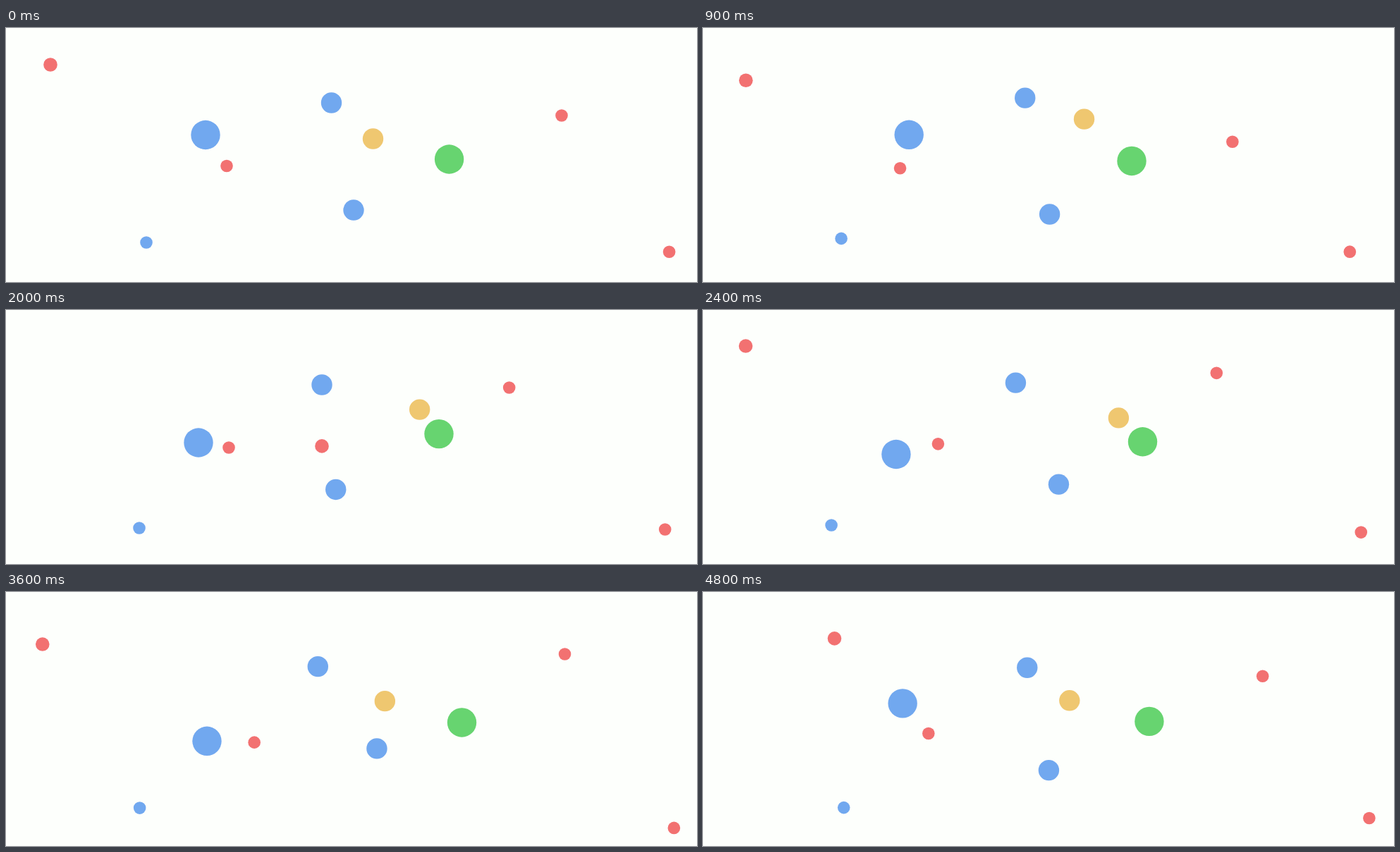
Recreate the animation shown at these times as an HTML page. Size 980 px wide and 360 px high, loop 4900 ms.

```html
<!DOCTYPE html>
<html lang="en">
<head>
<meta charset="utf-8">
<title>Drifting dots</title>
<style>
html, body { margin: 0; width: 100%; height: 100%; overflow: hidden; background: #fdfffc; }
svg { display: block; width: 980px; height: 360px; }
</style>
</head>
<body>
<svg id="stage" viewBox="0 0 980 360"></svg>
<script>
const LOOP = 4900, STEP = 100, CYCLE = 5000;
const BLUE = '#71a8ef', RED = '#f27171', GOLD = '#efc770', GREEN = '#67d470';
const BIG = 20.7, MEDIUM = 14.7, SMALL = 8.8;
const stage = document.getElementById('stage');

// Closed Catmull-Rom curve through waypoints evenly spaced in time.
function drift(waypoints, period = CYCLE) {
  const points = waypoints.split(' ').map(p => p.split(',').map(Number));
  const n = points.length;
  return time => {
    const s = time % period / period * n, i = Math.floor(s), u = s - i;
    const [a, b, c, d] = [-1, 0, 1, 2].map(k => points[(i + k + n) % n]);
    return [0, 1].map(k => b[k] + u / 2 * (c[k] - a[k] +
      u * (2 * a[k] - 5 * b[k] + 4 * c[k] - d[k] +
      u * (3 * (b[k] - c[k]) + d[k] - a[k]))));
  };
}

// Out and back, 0 to 1 to 0, with a soft start.
const swing = u => u > 0 && u < 1 ? Math.sin(Math.PI * u ** 1.2) : 0;

// Wanders near home, then dashes to the middle; y settles before x, which bends the way back.
function dasher() {
  const period = CYCLE / 2, start = 1520;
  const wander = drift('63,52 70,64 57,75 30,63 48,52', period);
  return time => {
    const t = time % period - start, [x, y] = wander(time);
    return [x + 400 * swing(t / 855), y + 142 * swing(t / 803)];
  };
}

function dot(color, r, at) {
  const el = document.createElementNS('http://www.w3.org/2000/svg', 'circle');
  el.setAttribute('r', r);
  el.setAttribute('fill', color);
  stage.append(el);
  return { el, at };
}

const dots = [
  dot(BLUE, BIG, drift('283,151.5 292,153 273,188 280,222 287,197')),
  dot(BLUE, MEDIUM, drift('461.5,106 456,99 448,106 438.5,98.6 447,110')),
  dot(BLUE, MEDIUM, drift('493,258 494,264 449,259 511,245 539,222 486,231')),
  dot(BLUE, SMALL, drift('199,304 195.6,298.5 189,309 175,298 199.5,311')),
  dot(GOLD, MEDIUM, drift('520.5,157 538,130 578,133 588,155 546,163 525.6,134')),
  dot(GREEN, BIG, drift('628.6,186 607,188 614,175.6 639,203.7 647,173')),
  dot(RED, SMALL, drift('313,195.5 279,199 316,195 354,187 344.5,226')),
  dot(RED, SMALL, drift('788,124 747,161.5 713.7,110 764,69.4 804,104.5')),
  dot(RED, SMALL, drift('940.6,317.3 916.6,317 934.7,311 930.6,324.6 956,337')),
  dot(RED, 9.8, dasher())
];

function draw(now) {
  const t = Math.floor(now % LOOP / STEP) * STEP;
  for (const { el, at } of dots) {
    const [x, y] = at(t);
    el.setAttribute('cx', x.toFixed(2));
    el.setAttribute('cy', y.toFixed(2));
  }
}

let start;
function tick(now) {
  start ??= now;
  draw(Math.max(0, now - start));
  requestAnimationFrame(tick);
}
draw(0);
requestAnimationFrame(tick);
</script>
</body>
</html>
```
